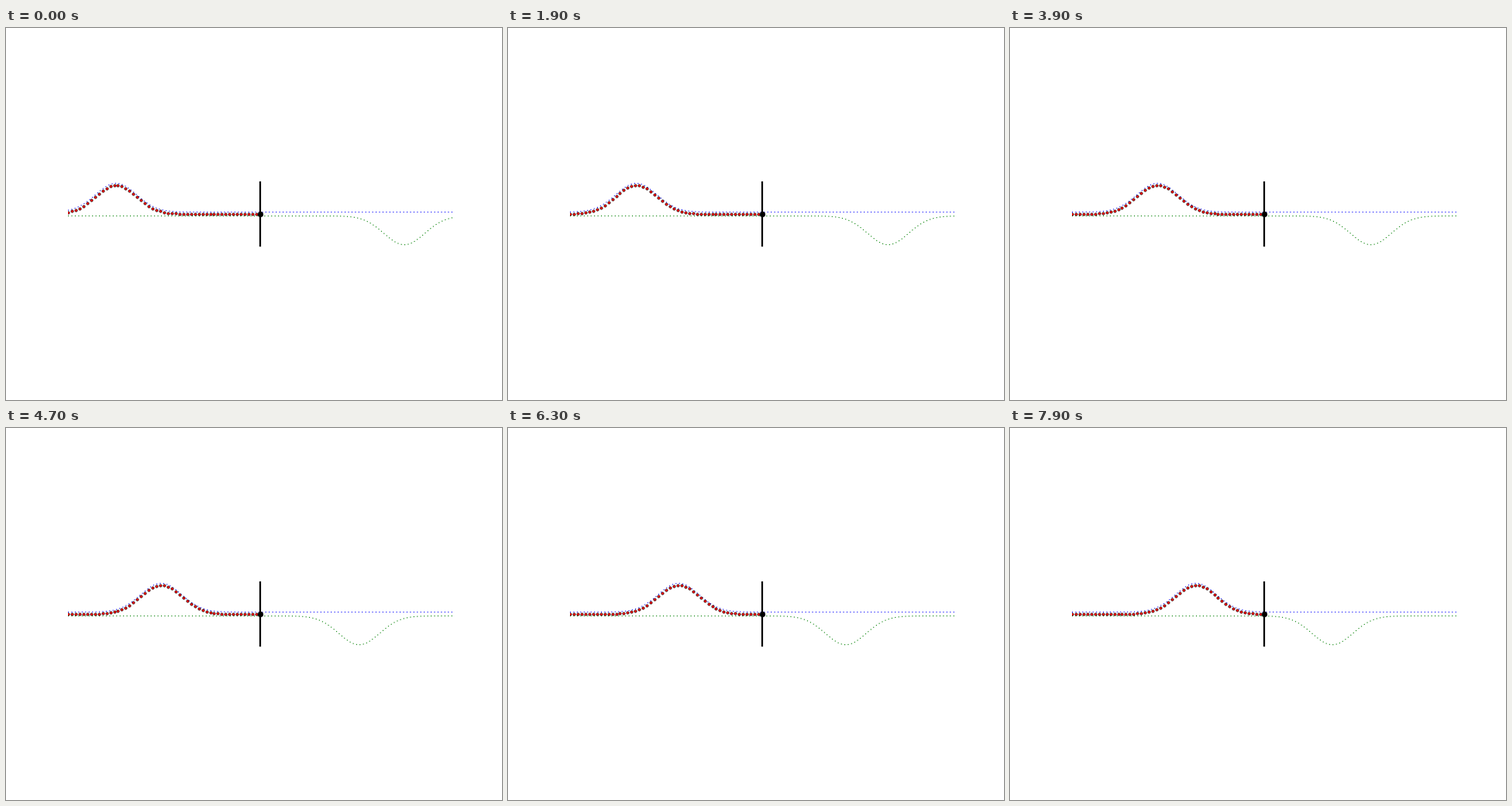
Recreate the animation shown at these times as a matplotlib script. Size 640 px wide and 480 px high, loop 8 s.

```python
import matplotlib.pyplot as plt
import numpy as np
from matplotlib.animation import FuncAnimation

FRAMES, INTERVAL = 80, 100
START, STEP = -1.5, 0.01        # pulse centre and its travel per frame
HEIGHT, WIDTH = 0.3, 0.3
GAP = 0.02                      # offset that keeps the two waves apart
WALL = 0.33

fig = plt.figure(figsize=(8, 6), dpi=80, facecolor="white")
ax = fig.add_axes([0.125, 0.1, 0.775, 0.8])
ax.set_axis_off()
ax.set_xlim(-2, 2)
y_max = 2 * 384 / 496           # equal scale on both axes
ax.set_ylim(-y_max, y_max)

x = np.linspace(-2, 2, 401)
x_string = np.linspace(-2, 0, 51)


def pulse(x, centre):
    return HEIGHT * np.exp(-((x - centre) / WIDTH) ** 2)


def dotted(color):
    return ax.plot([], [], color=color, lw=1, ls=(0, (1, 3)),
                   dash_capstyle="butt")[0]


incoming = dotted("b")
mirrored = dotted("g")
string, = ax.plot([], [], "r.", ms=6, mec="k", mew=0.5)
ax.plot([0, 0], [-WALL, WALL], "k-", lw=2)
ax.plot([0], [0], "ko", ms=6, mew=0.5)


def update(i):
    c = START + STEP * i
    incoming.set_data(x, pulse(x, c) + GAP)
    mirrored.set_data(x, -pulse(x, -c) - GAP)
    string.set_data(x_string, pulse(x_string, c) - pulse(x_string, -c))
    return incoming, mirrored, string


anim = FuncAnimation(fig, update, frames=FRAMES, interval=INTERVAL,
                     repeat=True, repeat_delay=0)
plt.show()
```
